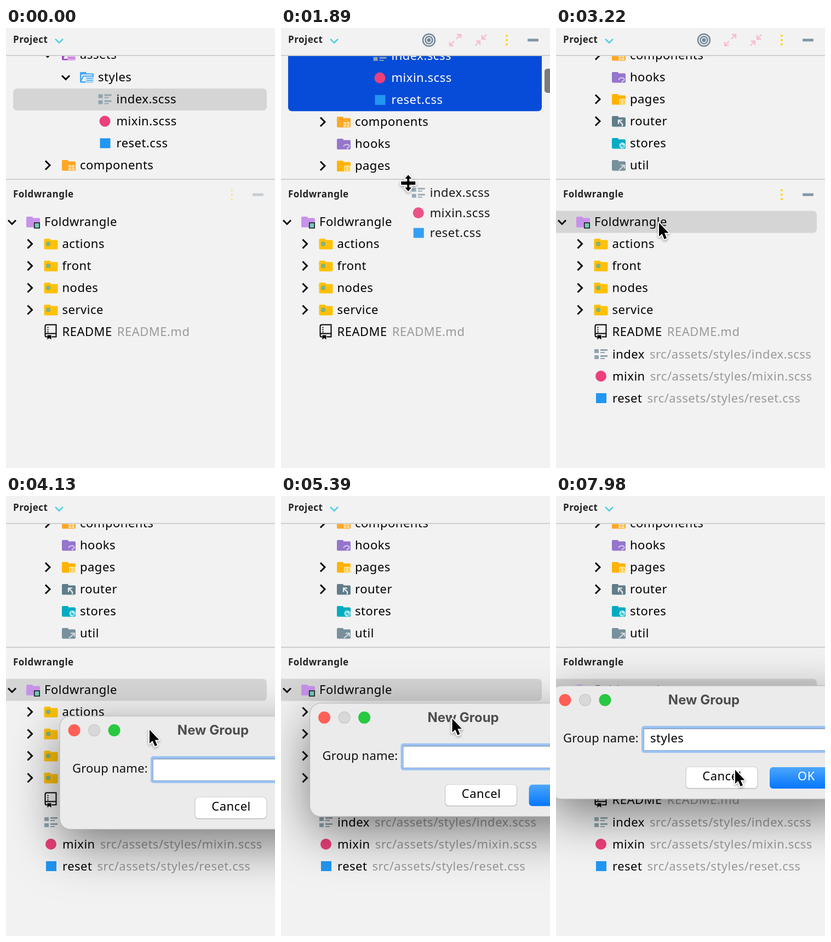
An HTML page with a canvas for the animation above (8 s loop, 491 by 800 pixels).

```html
<!DOCTYPE html>
<html lang="en">
<head>
<meta charset="utf-8">
<style>
html, body { margin: 0; width: 100%; height: 100%; overflow: hidden; background: #f2f2f2 }
canvas { display: block }
</style>
</head>
<body>
<canvas id="stage" width="491" height="800"></canvas>
<script>
const c = document.getElementById('stage').getContext('2d');
const LOOP = 8000, STEP = 70, NAME = 'Foldwrangle';
const BODY = '22px "Noto Sans", sans-serif', HEAD = 'bold 17px "Noto Sans", sans-serif';
const SLATE = '#8297a5';

// [time, x, y] of the pointer's hot spot
const pointerPath = [
  [70, 300, 815], [560, 290, 140], [770, 290, 140], [1120, 279, 196], [1330, 279, 205],
  [1470, 279, 205], [1750, 240, 268], [2240, 201, 339], [2520, 201, 339], [2900, 188, 354],
  [3300, 188, 354], [3900, 262, 425], [4970, 262, 425], [5100, 358, 428], [5180, 358, 428],
  [5650, 250, 373], [5740, 250, 373], [6080, 247, 438], [7770, 247, 438], [7980, 327, 498]
];
const typedAt = [6370, 6720, 6860, 6930, 7140, 7350];

const ramp = (t, a, b) => Math.max(0, Math.min(1, (t - a) / (b - a)));
const ease = (t, a, b) => { const k = ramp(t, a, b); return k * k * (3 - 2 * k); };
function pointerAt(t) {
  const i = Math.max(1, pointerPath.findIndex(p => p[0] >= t));
  const [a, b] = [pointerPath[i - 1], pointerPath[i]], k = ease(t, a[0], b[0]);
  return [a[1] + (b[1] - a[1]) * k, a[2] + (b[2] - a[2]) * k];
}

function rect(x, y, w, h, color, r = 0) {
  c.fillStyle = color;
  c.beginPath();
  c.roundRect(x, y, w, h, r);
  c.fill();
}
function disc(x, y, r, color) {
  c.fillStyle = color;
  c.beginPath();
  c.arc(x, y, r, 0, 7);
  c.fill();
}
function stroke(path, color, width) {
  c.strokeStyle = color;
  c.lineWidth = width;
  c.stroke(new Path2D(path));
}
function text(str, x, y, color = '#000', font = BODY, align = 'left', spacing = 0.5) {
  c.font = font;
  c.letterSpacing = spacing + 'px';
  c.textAlign = align;
  c.fillStyle = color;
  c.fillText(str, x, y);
  return c.measureText(str).width;
}
function at(x, y, draw) {
  c.save();
  c.translate(x, y);
  draw();
  c.restore();
}
function faded(alpha, draw) {
  if (alpha <= 0) return;
  c.save();
  c.globalAlpha = alpha;
  draw();
  c.restore();
}

function folder(color) {
  rect(0, -9.5, 12, 8, color, 2);
  rect(0, -7, 25, 17, color, 2);
}
function openFolder(color, light) {
  folder(color);
  rect(2.5, -5, 20, 12.5, '#f2f2f2');
  stroke('M1 9 L6 -2 H25', color, 2);
  rect(10, -1, 15, 11, light, 2);
  stroke('M12 2 H23 M12 6 H23', color, 1);
}

// Icons are drawn from their left edge, centred vertically
const icons = {
  assets() { openFolder('#9c3fc4', '#dfa8ee'); },
  styles() { openFolder('#42a5f5', '#b4dcfb'); },
  list() {
    for (const y of [-9, 2]) {
      rect(0, y, 8, 7, '#90a4ae');
      rect(11, y, 13, 3, '#90a4ae');
      rect(11, y + 5, 8, 2, '#90a4ae');
    }
  },
  mixin() { disc(12, 0, 10, '#ec407a'); },
  css() { rect(3, -9, 19, 18, '#2196f3'); },
  components() {
    folder('#ffa726');
    for (const [x, y] of [[12, 0], [18, 0], [12, 5], [18, 5]]) rect(x, y, 5, 4, '#ffe0a3');
  },
  hooks() { folder('#9575cd'); stroke('M13 5 a5 3 0 1 1 6 2 v3', '#d6c9ed', 2); },
  pages() {
    folder('#ffb300');
    rect(13, -1, 12, 11, '#ffe08c', 2);
    stroke('M17 2 l-2 3 2 3 M21 2 l2 3 -2 3', '#ffb300', 1.2);
  },
  router() { folder('#607d8b'); stroke('M12 5 V-2 H19 M12 -2 L19 5 V9', '#eceff1', 2.2); },
  stores() { folder('#00acc1'); disc(19, 4, 5.5, '#b2ebf2'); stroke('M15 5 h8 M17 1 l4 7', '#00acc1', 1.2); },
  util() { folder('#78909c'); stroke('M13 9 L23 0 M16 0 H23 V6', '#d5dde1', 2); },
  root() { folder('#c792ea'); rect(14, 1, 11, 11, '#111'); rect(15.5, 2.5, 8, 8, '#72c9b5'); },
  group() { folder('#ffc107'); disc(7.5, 0, 4, '#9a9c55'); disc(7.5, 0, 2.8, '#63c2ae'); },
  readme() {
    stroke('M6 9 H4 Q2 9 2 6 V-10 Q2 -13 5 -13 H22 V9 H14 M2 5 Q2 3 5 3 H22', '#000', 2);
    stroke('M7 -9 v2 M7 -5 v2 M7 -1 v2', '#000', 2);
    c.fillStyle = '#000';
    c.fill(new Path2D('M6 6 h7 v8 l-3.5 -3 -3.5 3z'));
  }
};

function chevron(x, y, open) {
  stroke(open ? `M${x - 7} ${y - 3} l7 7 7 -7` : `M${x - 4} ${y - 8} l8 8 -8 8`, '#000', 3);
}
// open: true or false shows a chevron, undefined none
function row(label, icon, x, y, { open, color, path } = {}) {
  if (open !== undefined) chevron(x - 26, y, open);
  at(x, y, icons[icon]);
  const width = text(label, x + 33, y + 7.5, color);
  if (path) text(path, x + 33 + width + 9, y + 7.5, '#999');
}

const files = [['index.scss', 'list'], ['mixin.scss', 'mixin'], ['reset.css', 'css']];

function more(y) {
  for (const dy of [-8, 0, 8]) rect(410, y + dy - 2, 4, 4, '#fdd835', 1);
  rect(450, y - 2.5, 20, 5, SLATE, 1);
}
function toolbar() {
  c.strokeStyle = '#74889a';
  c.lineWidth = 2.5;
  for (const r of [11, 6.5]) { c.beginPath(); c.arc(270, 22, r, 0, 7); c.stroke(); }
  disc(270, 22, 3.5, '#74889a');
  const pink = '#f8bbd0';
  stroke('M320 20 L328 12 M321 12 H328 V19 M316 24 L308 32 M308 25 V32 H315', pink, 2.3);
  stroke('M367 20 L375 12 M367 13 V20 H374 M363 24 L355 32 M356 24 H363 V31', pink, 2.3);
  more(22);
}

function projectPanel(t) {
  const scroll = 200 * ease(t, 1680, 2170), selected = t < 1260 ? 1 : 3, blue = t >= 600;
  c.save();
  c.beginPath();
  c.rect(0, 51, 491, 223);
  c.clip();
  at(0, -scroll, () => {
    rect(13, 110, 463, 40 * selected, blue ? '#064cd8' : '#d5d5d5', 7);
    row('assets', 'assets', 102, 48.5, { open: true });
    row('styles', 'styles', 135, 89.5, { open: true });
    files.forEach(([name, icon], i) =>
      row(name, icon, 168.5, 129.5 + 40 * i, { color: blue && i < selected ? '#fff' : '#000' }));
    ['components', 'hooks', 'pages', 'router', 'stores', 'util'].forEach((name, i) =>
      row(name, name, 102, 249.5 + 40 * i, { open: [0, 2, 3].includes(i) ? false : undefined }));
  });
  faded(ramp(t, 1610, 1750) * (1 - ramp(t, 2600, 2900)),
    () => rect(481, 59 + scroll * 0.19, 15, 44, '#7b7b7b', 5));
  c.restore();
  text('Project', 13, 27, '#222', HEAD);
  stroke('M90 20 l7 7 7 -7', '#4dd0e7', 2.5);
  faded(ramp(t, 400, 540) * (1 - ramp(t, 3990, 4130)), toolbar);
  rect(0, 49, 491, 2, '#d0d0d0');
  rect(0, 274, 491, 2, '#d0d0d0');
}

function groupPanel(t) {
  text(NAME, 13, 308, '#222', HEAD);
  const shown = t < 1000 ? (0.4 + 0.6 * ramp(t, 0, 140)) * (1 - ramp(t, 420, 560))
    : ramp(t, 2030, 2240) * (1 - ramp(t, 3990, 4130));
  faded(shown, () => more(303));
  if (t >= 2240 && t < 2520) {
    rect(0, 332, 491, 41, '#2f79b7');
    rect(0, 334, 491, 37, '#d3dee8');
  }
  if (t >= 2800) rect(-12, 332.5, 488, 40, '#d5d5d5', 7);
  row(NAME, 'root', 37, 352.5, { open: true });
  ['actions', 'front', 'nodes', 'service'].forEach((name, i) =>
    row(name, 'group', 69.5, 392.5 + 40 * i, { open: false }));
  row('README', 'readme', 69.5, 552.5, { path: 'README.md' });
  if (t >= 2520) files.forEach(([name, icon], i) =>
    row(name.split('.')[0], icon, 70, 593 + 40 * i, { path: 'src/assets/styles/' + name }));
}

function dialog(t) {
  c.save();
  c.shadowColor = 'rgba(0,0,0,.5)';
  c.shadowBlur = 90;
  c.shadowOffsetY = 28;
  rect(0, 0, 560, 206, '#ebebeb', 20);
  c.restore();
  c.strokeStyle = '#b4b4b4';
  c.lineWidth = 1;
  c.stroke();
  disc(26.5, 26, 11, '#ff5f57');
  disc(63, 26, 11, '#c4c4c4');
  disc(63, 26, 10, '#d8d8d8');
  disc(99.5, 26, 11, '#28c840');
  text('New Group', 280, 34, '#4d4d4d', 'bold 24px Inter, sans-serif', 'center', 0);
  text('Group name:', 23, 103, '#111', BODY, 'left', 0.2);
  rect(166, 73, 364, 49, '#9bc2f5', 5);
  rect(170, 77, 356, 41, '#8fa9c8');
  rect(171, 79, 354, 38, '#fff');
  text('styles'.slice(0, typedAt.filter(k => t >= k).length), 182, 103);
  rect(246.5, 147.5, 132, 40, '#bdbdbd', 7);
  rect(247.5, 148, 130, 38, '#fff', 6);
  text('Cancel', 313, 172, '#000', BODY, 'center');
  const shine = c.createLinearGradient(0, 148, 0, 187);
  shine.addColorStop(0, '#4da6fb');
  shine.addColorStop(1, '#0576fe');
  rect(400, 148, 131, 39, shine, 6);
  text('OK', 467, 172, '#fff', BODY, 'center');
}

const shapes = {
  arrow: new Path2D('M0 0 V25 L5.5 20 L9.8 30 L14 28 L9.8 18.5 H17.5 Z'),
  resize: new Path2D('M-13 -3 H-2 V-8 H-6 L0 -15 L6 -8 H2 V-3 H13 V3 H2 V8 H6 L0 15 L-6 8 H-2 V3 H-13 Z'),
  beam: new Path2D('M-6 -14 Q0 -14 0 -9 Q0 -14 6 -14 M0 -10 V10 M-6 14 Q0 14 0 9 Q0 14 6 14 M-3 2 H3')
};
function pointer(t, x, y) {
  if (t >= 6300 && t < 7770) return;
  const kind = t >= 1750 && t < 2520 ? 'resize' : t > 5740 && y > 420 && y < 465 ? 'beam' : 'arrow';
  const shape = shapes[kind];
  at(x, y, () => {
    c.lineJoin = 'round';
    c.strokeStyle = '#fff';
    c.lineWidth = 4;
    c.save();
    c.shadowColor = 'rgba(0,0,0,.35)';
    c.shadowBlur = 4;
    c.shadowOffsetY = 2;
    c.stroke(shape);
    c.restore();
    c.fillStyle = c.strokeStyle = '#000';
    c.lineWidth = 2.2;
    if (kind === 'beam') c.stroke(shape);
    else c.fill(shape);
  });
}

function draw(t) {
  const [x, y] = pointerAt(t);
  rect(0, 0, 491, 800, '#f2f2f2');
  projectPanel(t);
  groupPanel(t);
  if (t >= 1470 && t < 2520) faded(0.9, () => files.forEach(([name, icon], i) =>
    row(name, icon, x + 6.5, y + 17.5 + 36.5 * i)));
  const drag = ease(t, 5180, 5650);
  faded(ramp(t, 3920, 4130), () => at(98 - 108 * drag, 400 - 55 * drag, () => dialog(t)));
  pointer(t, x, y);
}

function tick() {
  const t = performance.now() % LOOP;
  draw(Math.floor(t / STEP) * STEP);
  requestAnimationFrame(tick);
}
tick();
</script>
</body>
</html>
```
